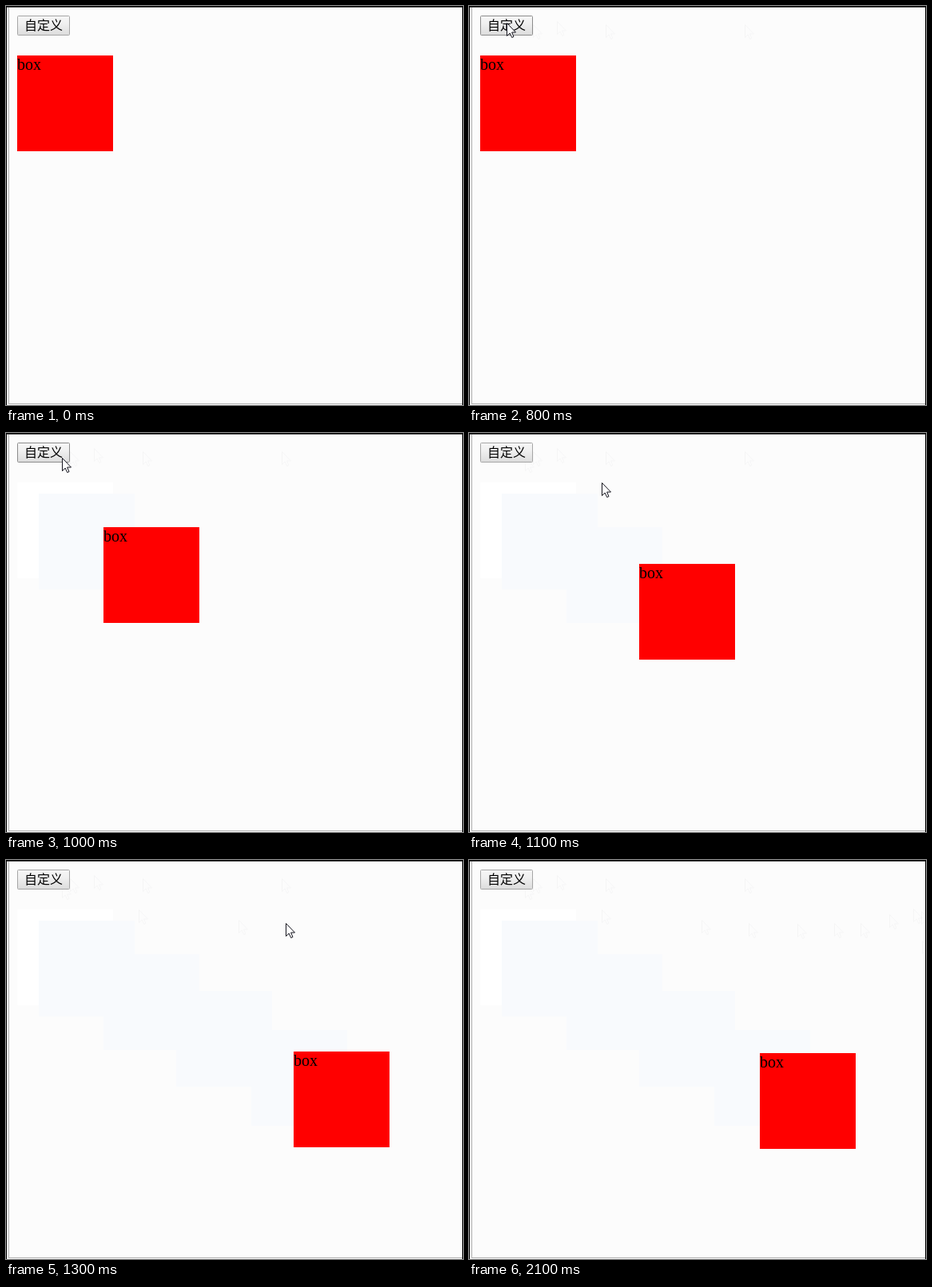
An HTML page that plays this animation: 572x500 px, repeating every 2600 ms.

```html
<!DOCTYPE html>
<html lang="zh">
<head>
<meta charset="utf-8">
<title>Box move</title>
<style>
html, body { margin: 0; width: 100%; height: 100%; overflow: hidden; background: #fcfcfc; }
svg { display: block; width: 572px; height: 500px; }
.cjk { font: 16px "Noto Sans CJK SC", "Noto Sans CJK", sans-serif; }
.label { font: 20px "Liberation Serif", serif; }
.ghost { opacity: .025; }
</style>
</head>
<body>
<svg viewBox="0 0 572 500">
  <defs>
    <linearGradient id="face" x2="0" y2="1">
      <stop offset="0" stop-color="#f6f6f6"/>
      <stop offset=".4" stop-color="#f0f0f0"/>
      <stop offset="1" stop-color="#dcdcdc"/>
    </linearGradient>
    <path id="arrow" d="M.5 .5V16.5L4.2 13L6.7 18.5L9 17.5L6.6 12H11.5Z" fill="#fff" stroke="#14141e"/>
  </defs>
  <rect width="572" height="500" fill="#fcfcfc"/>
  <g id="trail"></g>
  <g shape-rendering="crispEdges">
    <path d="M3.5 2V498.5H571" fill="none" stroke="#b0b0b0"/>
    <path d="M0 .5H572M.5 0V500M571.5 0V500" stroke="#000"/>
    <path d="M1 1.5H571" stroke="#555"/>
  </g>
  <rect id="button" x="14.5" y="12.5" width="65" height="24" rx="1" fill="url(#face)" stroke="#a6a6a6"/>
  <text class="cjk" x="23" y="30">自定义</text>
  <g id="box">
    <rect width="120" height="120" fill="#f00"/>
    <text class="label" y="18">box</text>
  </g>
  <use id="cursor" href="#arrow"/>
</svg>
<script>
const LOOP = 2600, STEP = 100;
const CURSOR_START = 2, BOX_START = 9;
const cursorPath = [
  [345, 23], [171, 23], [110, 19], [80, 23], [56, 22], [47, 21], [47, 21], [48, 22],
  [70, 31], [166, 62], [291, 75], [350, 79], [411, 80], [457, 79], [490, 79],
  [526, 68], [556, 61], [566, 64], [567, 101]
];
const boxPath = [[14, 62], [41, 76], [122, 118], [213, 164], [307, 213], [360, 240], [364, 242]];

const byId = id => document.getElementById(id);
const cursor = byId('cursor'), box = byId('box'), button = byId('button');
const place = (el, [x, y]) => el.setAttribute('transform', `translate(${x} ${y})`);
const trail = [];

function addTrail(tag, attrs, pos, from) {
  const el = document.createElementNS('http://www.w3.org/2000/svg', tag);
  for (const key in attrs) el.setAttribute(key, attrs[key]);
  place(el, pos);
  byId('trail').append(el);
  trail.push({ el, from });
}

// Faint marks left behind by the box and the pointer
boxPath.slice(0, 5).forEach((pos, i) =>
  addTrail('rect', { width: 120, height: 120, fill: i ? '#f8fafd' : '#fff' }, pos, BOX_START + i));
cursorPath.forEach((pos, i) => {
  if (pos[0] > 65) addTrail('use', { href: '#arrow', class: 'ghost' }, pos, CURSOR_START + i + 1);
});

function draw(time) {
  const step = Math.floor((time % LOOP) / STEP);
  const tip = cursorPath[step - CURSOR_START];
  cursor.style.display = tip ? '' : 'none';
  if (tip) place(cursor, tip);
  const hover = tip && tip[0] < 80 && tip[1] < 37;
  button.setAttribute('stroke', hover ? '#8c8c8c' : '#a6a6a6');
  const i = Math.max(0, Math.min(boxPath.length - 1, step - BOX_START + 1));
  place(box, boxPath[i]);
  for (const { el, from } of trail) el.style.display = step >= from ? '' : 'none';
}

const start = performance.now();
function tick() {
  draw(performance.now() - start);
  requestAnimationFrame(tick);
}
tick();
</script>
</body>
</html>
```
